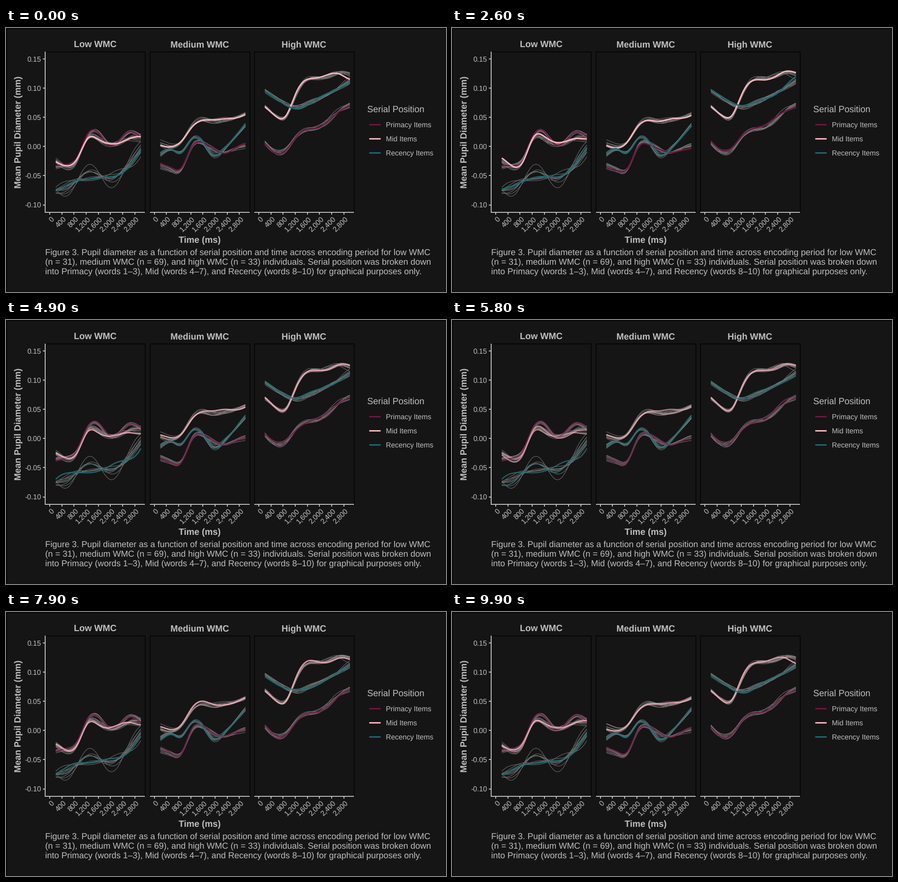
Animation of 966 by 580 pixels, one loop 10000 ms. Source, as a matplotlib script:

```python
import numpy as np
import matplotlib.pyplot as plt
from matplotlib.animation import FuncAnimation
from matplotlib.collections import LineCollection
from matplotlib.patches import Rectangle

W, H, DPI = 966, 580, 100
PX = 72 / DPI
SAMPLES, HOLD, PERIOD = 10, 7, 10
BG, INK, GREY = "#151515", "#bfbfbf", "#757575"
COLORS = {"Primacy": "#701643", "Mid": "#ffb6c1", "Recency": "#166c72"}
PANELS = [("Low WMC", 86), ("Medium WMC", 315.5), ("High WMC", 545)]
PANEL_W, TOP, BOTTOM = 219, 52, 404.5
KNOTS = np.linspace(200, 3000, 9)

# Mean curve through the knots (thousandths of a mm), then how far the samples
# share a slow sway and how far each wobbles on its own.
CURVES = {
    (0, "Primacy"): ((-35, -32, -21, 19, 25, 5, 11, 25, 17), 0, 1.5),
    (0, "Mid"): ((-25, -35, -24, 14, 13, 5, 7, 14, 15), 1.8, 1.9),
    (0, "Recency"): ((-76, -70, -57, -49, -50, -53, -46, -28, -4), 8.5, 2.3),
    (1, "Primacy"): ((-33, -40, -38, 1, 5, -5, -10, -4, 1), 0, 1.6),
    (1, "Mid"): ((5, 0, 9, 36, 47, 44, 45, 49, 57), 1.6, 2),
    (1, "Recency"): ((-13, -5, -9, 14, 7, -15, -5, 15, 36), 0, 1.4),
    (2, "Primacy"): ((6, -10, -5, 18, 29, 32, 45, 62, 72), 1, 2),
    (2, "Mid"): ((68, 53, 52, 91, 115, 118, 120, 126, 123), -1, 2.3),
    (2, "Recency"): ((96, 84, 73, 68, 73, 81, 90, 101, 113), 0, 2.2),
}
SWAY = (-0.4, 0.8, -0.3, 2, 0.1, -1.2, 0.3, 0.4, -0.6, -0.1)


def spline(values, x):
    """Natural cubic spline through the evenly spaced knots."""
    v, h, n = np.asarray(values, float), KNOTS[1] - KNOTS[0], len(KNOTS)
    system, rhs = np.eye(n), np.zeros(n)
    for i in range(1, n - 1):
        system[i, i - 1:i + 2] = 1, 4, 1
        rhs[i] = 6 * (v[i - 1] - 2 * v[i] + v[i + 1])
    m = np.linalg.solve(system, rhs)
    i = np.clip((x - KNOTS[0]) // h, 0, n - 2).astype(int)
    b = (x - KNOTS[i]) / h
    a = 1 - b
    return a * v[i] + b * v[i + 1] + ((a**3 - a) * m[i] + (b**3 - b) * m[i + 1]) / 6


def wobble(rng, u, waves=6):
    """Smooth random curve of about unit size over u from 0 to 1."""
    weights = rng.uniform(-1.7, 1.7, waves)
    return np.sqrt(2 / waves) * weights @ np.cos(np.pi * np.outer(range(waves), u))


def to_x(left, ms):
    return left + 10 + ms / 15


def to_y(mm):
    return 260.3 - 1282 * mm


rng = np.random.default_rng(7)
ms = np.linspace(KNOTS[0], KNOTS[-1], 141)
u = (ms - ms[0]) / np.ptp(ms)
slow_wave = np.cos(2 * np.pi * (ms - 1330) / 1550)
paths = {}
for (panel, name), (mean, sway, own) in CURVES.items():
    for s in range(SAMPLES):
        level = spline(mean, ms) + sway * SWAY[s] * slow_wave + own * wobble(rng, u)
        paths[panel, name, s] = np.column_stack(
            [to_x(PANELS[panel][1], ms), to_y(level / 1000)])

plt.rcParams.update({"font.family": "Liberation Sans", "text.hinting": "none"})
fig = plt.figure(figsize=(W / DPI, H / DPI), dpi=DPI, facecolor=BG)
ax = fig.add_axes([0, 0, 1, 1])
ax.set(xlim=(0, W), ylim=(H, 0))
ax.axis("off")


def text(x, y, string, size, **kw):
    ax.text(x, y, string, fontsize=size * PX, color=INK, **{"va": "baseline", **kw})


def line(xs, ys, color=INK, width=2.0, **kw):
    kw = {"solid_capstyle": "butt", **kw}
    return ax.plot(xs, ys, color=color, lw=width * PX, **kw)[0]


def outline(x, y, w, h):
    ax.add_patch(Rectangle((x, y), w, h, fill=False, ec="black", lw=1.4 * PX))


outline(0.5, 0.5, W - 1, H - 1)
for title, left in PANELS:
    outline(left, TOP, PANEL_W, BOTTOM - TOP)
    text(left + PANEL_W / 2, 42.5, title, 19.7, weight="bold", ha="center")
    line([left, left + PANEL_W], [BOTTOM, BOTTOM], zorder=5)
    for t in range(0, 2801, 400):
        x = to_x(left, t)
        line([x, x], [BOTTOM, BOTTOM + 5])
        text(x + 10, 420.5, f"{t:,}", 15.7, rotation=45,
             rotation_mode="anchor", ha="right")

line([86, 86], [TOP, BOTTOM + 1], zorder=5)
for hundredths in range(-10, 16, 5):
    y = to_y(hundredths / 100)
    line([81, 86], [y, y])
    text(77.5, y + 5.6, f"{hundredths / 100:.2f}", 15.7, ha="right")

text(425, 472, "Time (ms)", 19.7, weight="bold", ha="center")
text(32.5, 228.5, "Mean Pupil Diameter (mm)", 19.7, weight="bold", ha="center",
     rotation=90, rotation_mode="anchor")

text(793, 184.5, "Serial Position", 19.7)
for i, (name, color) in enumerate(COLORS.items()):
    y = 212 + 30.9 * i
    line([797, 821.5], [y, y], color, 3.1)
    text(834, y + 5.8, f"{name} Items", 15.7)

CAPTION = (
    "Figure 3. Pupil diameter as a function of serial position and time "
    "across encoding period for low WMC",
    "(n = 31), medium WMC (n = 69), and high WMC (n = 33) individuals. "
    "Serial position was broken down",
    "into Primacy (words 1–3), Mid (words 4–7), and Recency (words 8–10) "
    "for graphical purposes only.",
)
for i, row in enumerate(CAPTION):
    text(86, 499.5 + 20.6 * i, row, 18.86)

ax.add_collection(LineCollection(list(paths.values()), colors=GREY,
                                 linewidths=PX, zorder=3))

# Two layers of lines: the sample leaving and the sample arriving.
layers = [{key: line([], [], COLORS[key[1]], 3.1, zorder=4) for key in CURVES}
          for _ in range(2)]


def draw(frame):
    sample, step = divmod(frame, PERIOD)
    fade = max(0, step - HOLD + 1) / (PERIOD - HOLD + 1)
    for layer, s, alpha in ((layers[0], sample, 1 - fade),
                            (layers[1], (sample + 1) % SAMPLES, fade)):
        for (panel, name), artist in layer.items():
            artist.set_data(*paths[panel, name, s].T)
            artist.set_alpha(alpha)
            artist.set_visible(alpha > 0)
    return [artist for layer in layers for artist in layer.values()]


anim = FuncAnimation(fig, draw, frames=SAMPLES * PERIOD, interval=100,
                     repeat=True, repeat_delay=0, blit=False)
plt.show()
```
